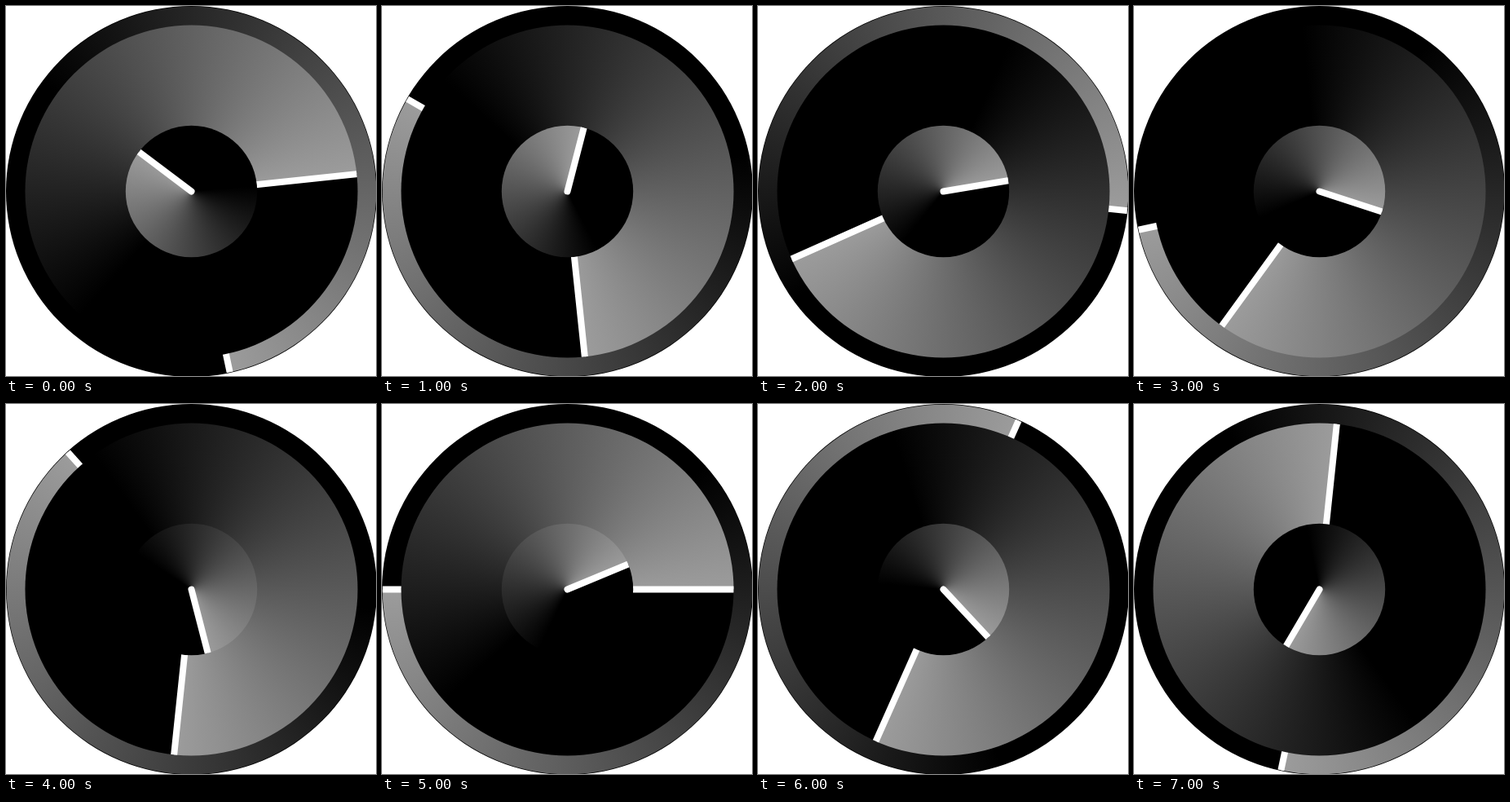
An HTML page with a canvas for the animation above (8 s loop, 454x454 px).

```html
<!DOCTYPE html>
<html lang="en">
<head>
<meta charset="utf-8">
<title>Conic clock</title>
<style>
html, body { margin: 0; width: 100%; height: 100%; overflow: hidden; background: #fff; }
canvas { display: block; width: 454px; height: 454px; }
</style>
</head>
<body>
<canvas id="clock" width="454" height="454"></canvas>
<script>
const ctx = document.getElementById('clock').getContext('2d');
const C = 227.5, TAU = Math.PI * 2;
const STEP = 1000;
const FADE = 222 / 360; // share of the turn covered by the trail

// hour, minute, second shown in each step
const times = [
  [10, 14, 28], [12, 29, 50], [2, 41, 16], [3, 36, 43],
  [5, 31, 53], [2, 15, 45], [4, 34, 4], [7, 1, 32]
];

function disc(r) {
  ctx.beginPath();
  ctx.arc(C, C, r, 0, TAU);
}

function dial(r, turn, inner) {
  const a = turn * TAU - Math.PI / 2;
  const trail = ctx.createConicGradient(a, C, C);
  trail.addColorStop(0, '#000');
  trail.addColorStop(1 - FADE, '#000');
  trail.addColorStop(1, '#9c9c9c');
  ctx.save();
  disc(r);
  ctx.fillStyle = trail;
  ctx.fill();
  ctx.clip();
  ctx.beginPath();
  ctx.moveTo(C + inner * Math.cos(a), C + inner * Math.sin(a));
  ctx.lineTo(C + (r + 8) * Math.cos(a), C + (r + 8) * Math.sin(a));
  ctx.strokeStyle = '#fff';
  ctx.lineWidth = 8;
  ctx.lineCap = 'round';
  ctx.stroke();
  ctx.restore();
}

function draw(ms) {
  const [h, m, s] = times[Math.floor(ms / STEP) % times.length];
  ctx.clearRect(0, 0, 454, 454);
  disc(227.5);
  ctx.fillStyle = '#000';
  ctx.fill();
  dial(226.8, s / 60, 190);
  dial(204, m / 60, 70);
  dial(80.7, (h + m / 60) / 12, 0);
}

const start = performance.now();
function tick() {
  draw(performance.now() - start);
  requestAnimationFrame(tick);
}
tick();
</script>
</body>
</html>
```
